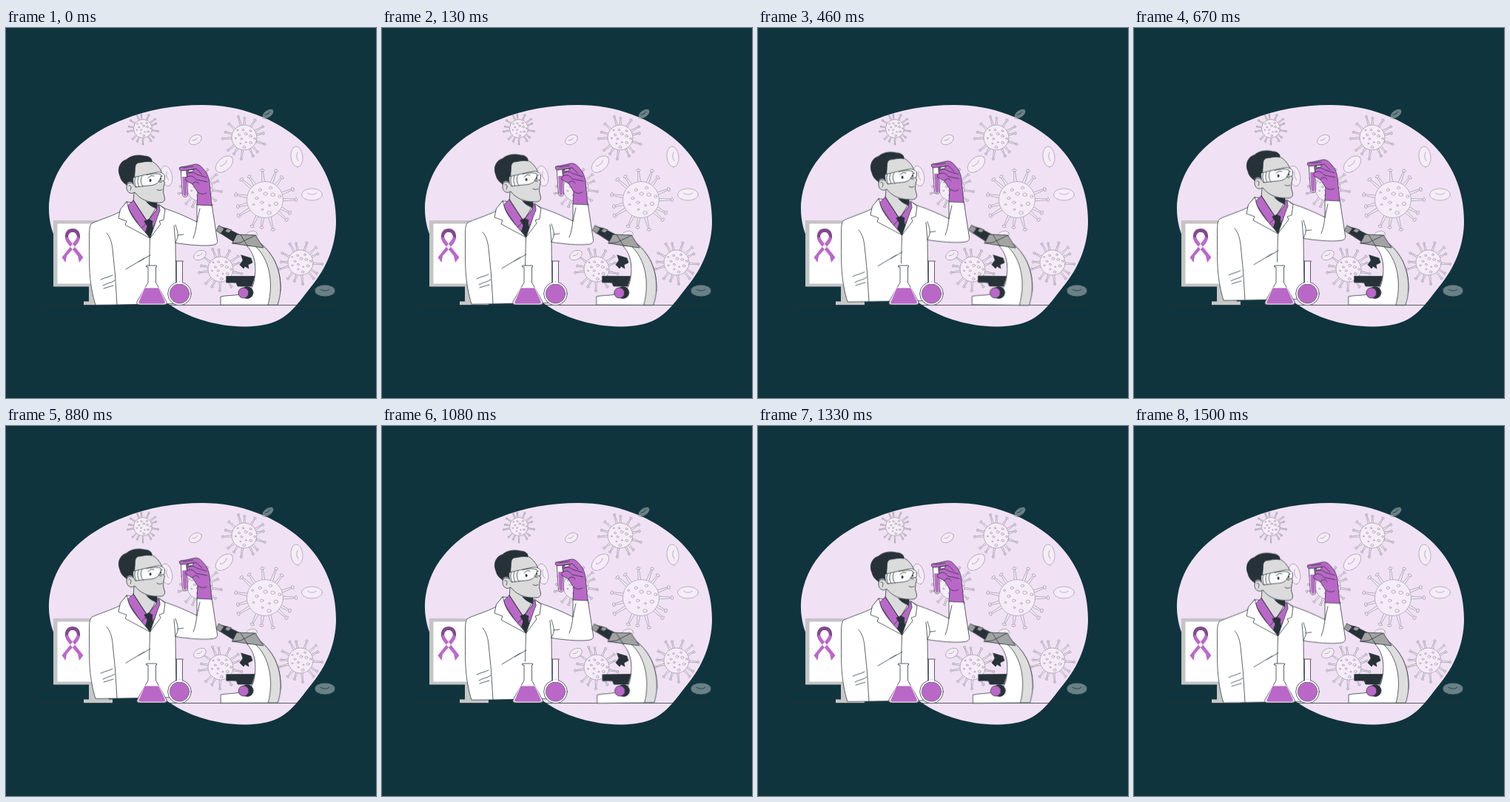
An HTML page that plays this animation: 500 px wide and 500 px high, repeating every 1540 ms.

```html
<!DOCTYPE html>
<html lang="en">
<head>
<meta charset="utf-8">
<title>Laboratory</title>
<style>
  html, body { margin: 0; width: 100%; height: 100%; overflow: hidden; background: #0f343d; }
  svg { display: block; width: 100%; height: 100%; }
  .ink { stroke: #263238; stroke-width: .75; stroke-linejoin: round; stroke-linecap: round; }
  .line { fill: none; }
  .dark { fill: #263238; }
  .skin { fill: #dbdbdb; }
  .plum { fill: #ba68c8; }
  .white { fill: #fff; }
  #scope { transform-box: view-box; transform-origin: 328px 320px; }
</style>
</head>
<body>
<svg viewBox="0 0 500 500">
  <path fill="#f1e1f4" d="M58 246C58 187 102 145 158 124C192 110 228 104 265 104C316 104 364 122 399 153C430 181 446 219 446 261C446 294 433 325 412 350C397 369 385 388 363 397C350 402 335 403.500 320 403.500C286 403 251 393 226 377C200 360 174 348 140 344C97 338 59 296 58 246Z"/>
  <g id="germs" class="ink white" opacity=".38"></g>

  <g id="monitor">
    <path fill="#c7c7c7" d="M112 345H136L139 371H112ZM105 369.500H144V374.500H105Z"/>
    <path fill="#c4c4c4" d="M64 260H184V349.500H64Z"/>
    <path class="white" d="M69.500 264.500H178V345.500H69.500Z"/>
    <path class="plum" d="M80 281C79 287 84 292 88 297L97 308L99 317L104.500 310L91 293C87 288 84 285 84 280ZM100 281C101 287 96 292 92 297L82 308L80.500 317L75.500 310L89 293C93 288 96 285 96 280Z"/>
    <path fill="#82498c" d="M80 284C79 275 84 271 90 271S101 275 100 284L96 282C95 277 93 276 90 276S85 277 84 282Z"/>
  </g>
  <path class="ink line" d="M48 374.500H446"/>

  <g id="man">
    <g class="ink">
      <path class="white" d="M153 249C141 255 124 260 116 264C112 267 112.500 277 112.500 290C112.500 315 112 332 116 354C117.500 362 119 368 121 374.300L150 374L230 372.500L229 290.500C246 293 266 295 278 293.500C284 293 286 291 285.500 287L278 238H258L258 262C244 255 230 249 215 244L207 239L163 235Z"/>
      <path class="skin" d="M173 222L172 236L191 262L204 246L203 230Z"/>
      <path class="dark" d="M190 235L204 236.500L203.500 244C198 242 193 239 190 235Z"/>
      <path class="skin" d="M197 180C203 183 207 188 210 194L211 203L214.500 209L213 215L212.500 222L214.500 230C215 235 211 236.500 205 236C191 236 181 231 174 222C168 226 162 221 163 214C163 209 169 208 172 211L172 182Z"/>
      <path class="dark" d="M163 212C158 209 155 205 154 200C151 193 152 186 157 181C160 178 162 179 165 176C171 172 180 171 187 173C194 173 198 177 197 181C190 179 184 182 179 182C173 184 175 190 174 196L173 210C168 206 163 208 163 212Z"/>
      <path class="line" d="M166 213C169 212 170 215 168 219M204 218.500C207 220 209 219.500 211 218.500M207 208L210 208.500"/>
      <path fill="#fff" fill-opacity=".88" d="M172 202C181 200 193 197 204 195C209 194 214 197 214.500 200L214 206C212 208 209 205 207 207C204 211 199 213 192 213L175 215C172 212 171 206 172 202Z"/>
      <path class="line" d="M175 202C173 206 174 211 176 215M179 201C177 206 178 211 180 214.500M184 200C181 204 182 210 185 214M190 198.500C200 196 207 197 209 198C211 201 208 204 206 207M192 202.500L196 199.500L200 200M209 201.500L211.500 200"/>
      <ellipse class="dark" cx="195" cy="206" rx="1" ry="1.800"/>
      <ellipse class="dark" cx="209" cy="204" rx=".5" ry="1.200"/>

      <path class="plum" d="M172 233L164.500 240L168 254L194 284L213 245L204 239L203.500 246L191 261Z"/>
      <path class="line" d="M172 233L191 262L183 271L165 244M203.500 242L191 262L200 268L211 248"/>
      <path class="dark" d="M187 261L193 258.500L198 261L197 267L200 272L195 284L188.500 276L191 268Z"/>
      <path class="white" d="M163 235L154.500 245L152 257L163 261L161 266L194.500 284C185 271 168 257 164.500 240Z"/>
      <path class="white" d="M207 239L215 245L213 259L207 261L209 265L194.500 284C200 270 204 256 208 247Z"/>
      <path class="line" d="M194.500 284L193.500 322M136 277C141 283 143 290 144 299L147.500 334L150 374M128 340C134 337 138 337 144 334M131 348C138 344 142 345 147 341M132 352L145 348M162 326L187 311M179 316L195 307M229 290.500L227 267M229 266C231 273 233 277 232 283L229 290M258 262C257 270 256 277 253 284M258 262L262 244M232 280L240 279"/>
    </g>
    <g class="ink">
      <path class="white" d="M236.500 190H244L245.500 226C245 229 239 229 238.500 226Z"/>
      <path class="plum" stroke="none" d="M238.300 201H244L244.600 225C244 227.500 240 227.500 239.500 225Z"/>
      <ellipse cx="239" cy="190" rx="4" ry="2.500" class="white"/>
      <path class="plum" d="M235 188.500L247 186L256 184C261 184 264 187 267 191C272 196 274 202 275 209L278 240L258 239L259 222L252 211L243 206C242 204 243 202 245 201L244 196C243 193 245 192 248 192L237 193C234 192 233.500 190 235 188.500Z"/>
      <path class="white" d="M247 192L254 191L252 194L246 195Z"/>
      <path class="line" d="M248 192L257 190L265 198M245 197C250 194 254 195 258 198L271 202M245 201C250 199 253 200 257 205L272 208M252 211C254 207 259 207 261 211M259 222C264 225 267 225 271 223M240 189L253 187"/>
    </g>
  </g>

  <g id="scope" class="ink">
    <path class="white" d="M326 295C337 307 339 323 335 343C333 354 325 360 315 360C307 362 298 361 290 363V374.300H365L371 355C372 329 363 307 344 291Z"/>
    <path fill="#dedede" d="M337 295C356 312 362 344 354 374.300H367C369 368 371 360 371 351C371 325 361 305 344 291Z"/>
    <path class="dark" d="M318 307L331 311L333 317L327 320L328 325L323 322L321 325L316 320L320 314ZM298 335.500H336L332 349H313L311 344H298Z"/>
    <circle class="dark" cx="326" cy="357.500" r="8"/>
    <circle class="plum" cx="321" cy="358" r="7"/>
    <path class="dark" d="M291 269L299 271L319 281L311 291L289 277Z"/>
    <path fill="#9b9b9b" d="M288 267L295 271L290 278L284.500 274ZM299 271L305 273L301 277L296 275Z"/>
    <path fill="#a3a3a3" d="M312 279L337 280L348 297L326 294L306 291Z"/>
    <path class="line" d="M317 279.500L326 294M306 291L317 290L337 280"/>
  </g>

  <g id="flasks" class="ink">
    <path fill="#fff" fill-opacity=".75" d="M190 321H203.500V323H202.500V344L217 370C218 373 216 374 214 374H180C177 374 176 372 177.500 369L192 344V323H190Z"/>
    <path class="plum" stroke="#fff" d="M187.500 351H206.500L215 369C216 372 214 373 212 373H182C179 373 178 371 180 368Z"/>
    <path fill="#fff" fill-opacity=".65" d="M229.500 315H239.500L238.500 316V347H230.500V316Z"/>
    <circle class="white" cx="234.500" cy="359" r="15.800"/>
    <circle class="plum" cx="234.500" cy="359" r="13.200" stroke-width=".4"/>
    <path class="white" stroke="none" d="M231 343H238V346H231Z"/>
  </g>
</svg>
<script>
  const NS = "http://www.w3.org/2000/svg";
  const germs = document.getElementById("germs");

  function add(parent, tag, attrs) {
    const el = document.createElementNS(NS, tag);
    for (const key in attrs) el.setAttribute(key, attrs[key]);
    return parent.appendChild(el);
  }

  function virus(x, y, r, reach, count, turn) {
    const g = add(germs, "g", { transform: `translate(${x} ${y}) rotate(${turn})` });
    const k = r / 24;
    for (let i = 0; i < count; i++) {
      const tip = reach - (i % 3 === 1 ? 4 * k : i % 3 * k);
      const angle = i * 360 / count + 5 * Math.sin(i * 2.3);
      const spike = add(g, "g", { transform: `rotate(${angle})` });
      add(spike, "path", { d: `M${r - 1} ${-1.7 * k}L${tip - 2 * k} ${-.8 * k}V${.8 * k}L${r - 1} ${1.7 * k}Z` });
      add(spike, "ellipse", { cx: tip - k, cy: 0, rx: 1.5 * k, ry: 2.7 * k });
    }
    add(g, "circle", { r });
    for (let i = 1; i < 14; i++) {
      const d = r * .86 * Math.sqrt(i / 14), a = i * 2.4;
      add(g, "ellipse", {
        cx: d * Math.cos(a), cy: d * Math.sin(a),
        rx: (1.4 + i % 3 * .65) * k, ry: (1.2 + i % 3 * .5) * k
      });
    }
  }

  function cell(x, y, rx, ry, turn) {
    const g = add(germs, "g", { transform: `translate(${x} ${y}) rotate(${turn})` });
    add(g, "ellipse", { rx, ry });
    add(g, "path", { class: "line", d: `M${-rx * .42} ${-ry * .2}Q0 ${ry * .25} ${rx * .42} ${-ry * .2}` });
  }

  // x, y, body radius, spike reach, spikes, rotation
  [[185, 136, 12.5, 21.5, 14, 10], [322, 148, 17, 30, 14, 18], [350, 232, 24.5, 43, 15, 0],
   [398, 317, 17, 30, 14, 4], [290, 326, 17, 30, 14, 12], [262, 217, 17, 30, 14, 8]
  ].forEach(v => virus(...v));

  // x, y, radii, rotation
  [[256, 151, 9, 6, -28], [295, 184, 14, 8.5, -42], [354, 116, 9, 5, -36],
   [393, 174, 14, 8, 84], [413.5, 225, 14, 8, 0], [431, 355, 14, 8, 0],
   [262, 307, 9, 6, -28], [331, 281, 9, 6, -28], [217, 200, 14, 7.5, 78]
  ].forEach(c => cell(...c));

  const loop = { duration: 1540, iterations: Infinity, easing: "linear" };
  const play = (id, steps) => document.getElementById(id).animate(
    steps.map(([offset, transform]) => ({ offset, transform })), loop);

  play("man", [[0, "translateY(0px)"], [.49, "translateY(-7px)"], [1, "translateY(0px)"]]);
  play("scope", [[0, "rotate(0deg)"], [.25, "rotate(1deg)"], [.75, "rotate(-1deg)"], [1, "rotate(0deg)"]]);
</script>
</body>
</html>
```
